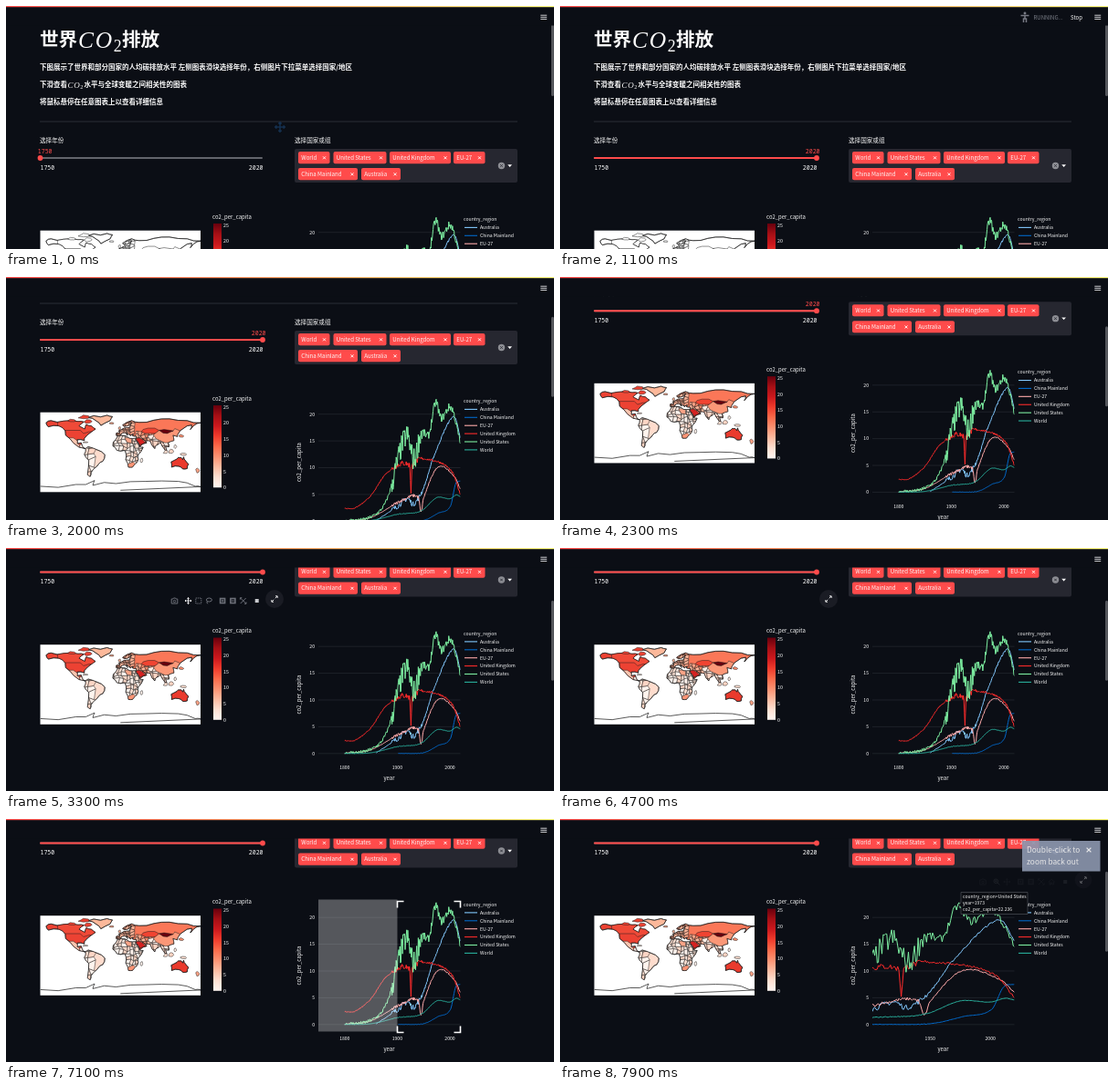
Animation of 600 by 267 pixels, one loop 8 s. Source, as an HTML page:

```html
<!DOCTYPE html>
<html lang="zh">
<head>
<meta charset="utf-8">
<style>
  html, body { margin: 0; width: 100%; height: 100%; overflow: hidden; background: #0b0e15; }
  svg { display: block; width: 100%; height: 100%; }
  text { font-family: 'Noto Sans CJK SC', sans-serif; font-weight: 500; fill: #fafafa; white-space: pre; }
  .mono { font-family: 'Noto Sans Mono', monospace; font-weight: 400; }
  .math { font-family: 'Liberation Serif', serif; font-weight: 400; }
  .italic { font-style: italic; }
  .bold { font-weight: 700; }
  .light { font-weight: 400; }
  #land { stroke: #1c1c1c; stroke-width: 1; stroke-linejoin: round; }
  #land .coast { fill: none; stroke-width: 1.5; }
  #land.plain polygon:not(.coast) { fill: #fff; }
  .icon { fill: none; stroke: #6d7079; }
  .icon.on { stroke: #e4e4e6; }
</style>
</head>
<body>
<svg id="stage" viewBox="0 0 600 267"></svg>
<script>
const BG = '#0b0e15', RED = '#ff4b4b';

// ---------- helpers ----------
const text = (x, y, str, size, cls = '', attrs = '') =>
  `<text x="${x}" y="${y + size * .36}" font-size="${size}" class="${cls}" ${attrs}>${str}</text>`;
const rect = (x, y, w, h, fill, attrs = '') =>
  `<rect x="${x}" y="${y}" width="${w}" height="${h}" fill="${fill}" ${attrs}/>`;
const line = (x1, y1, x2, y2, stroke, width = 1) =>
  `<path d="M${x1} ${y1}L${x2} ${y2}" stroke="${stroke}" stroke-width="${width}"/>`;
const cross = (x, y, r, stroke, width = 1) =>
  line(x - r, y - r, x + r, y + r, stroke, width) + line(x - r, y + r, x + r, y - r, stroke, width);
const ramp = (t, a, b) => Math.min(1, Math.max(0, (t - a) / (b - a)));
const END = 'text-anchor="end"', MID = 'text-anchor="middle"';

let seed = 7;
const random = () => (seed = seed * 16807 % 2147483647) / 2147483647;
const jitter = size => (random() - .5) * size;
const pick = list => list[Math.floor(random() * list.length)];
const parse = points => points.split(' ').map(p => p.split(',').map(Number));

// ---------- page top ----------
const formula = (x, y, size) =>
  text(x, y, 'C', size, 'math italic') + text(x + size * .74, y, 'O', size, 'math italic') +
  text(x + size * 1.52, y + size * .25, '2', size * .7, 'math');

const tag = (x, y, width, label) =>
  rect(x, y, width, 13.2, RED, 'rx="2"') + text(x + 3.3, y + 6.7, label, 6.1) +
  cross(x + width - 6, y + 6.8, 1.5, '#fff', .9);

const intro = `
  ${text(37, 37, '世界', 20.6, 'bold')}${formula(79, 37, 25.5)}${text(127, 37, '排放', 20.6, 'bold')}
  ${text(37, 67, '下图展示了世界和部分国家的人均碳排放水平 左侧图表滑块选择年份，右侧图片下拉菜单选择国家/地区', 7.5, 'bold')}
  ${text(37, 86.5, '下滑查看', 7.5, 'bold')}${formula(67.5, 86.5, 9)}
  ${text(85.5, 86.5, '水平与全球变暖之间相关性的图表', 7.5, 'bold')}
  ${text(37, 105.5, '将鼠标悬停在任意图表上以查看详细信息', 7.5, 'bold')}
  ${line(37, 127, 560, 127, '#2b2e36')}
  ${text(37, 147.5, '选择年份', 6.6, 'light')}${text(316, 147.5, '选择国家或组', 6.6, 'light')}`;

const slider = `
  ${rect(37, 166, 244, 2, '#62646b', 'rx="1"')}<g id="slider"></g>
  ${text(37.5, 177.5, '1750', 6.54, 'mono')}${text(281.5, 177.5, '2020', 6.54, 'mono', END)}`;

const picker = `
  ${rect(316, 157, 244, 37, '#262730', 'rx="2"')}
  ${tag(320, 160, 34.5, 'World')}${tag(358.5, 160, 58, 'United States')}
  ${tag(420, 160, 67, 'United Kingdom')}${tag(490, 160, 34.5, 'EU-27')}
  ${tag(320, 178, 65, 'China Mainland')}${tag(389, 178, 43, 'Australia')}
  <circle cx="542.5" cy="175.5" r="3.7" fill="#8d8e94"/>${cross(542.5, 175.5, 1.3, '#262730', .8)}
  <path d="M549.2 174.3h4.8l-2.4 2.6z" fill="#fafafa"/>`;

// ---------- world map: coarse outlines in degrees, roughened by chance ----------
const HOT = '#ec4233', WARM = '#fa7758', PALE = ['#fff3ed', '#fff3ed', '#ffeee6', '#fee0d2', '#fdd5c4'];
const SALMON = ['#fb8d6d', '#fca285', '#fcb499', '#fcbba1'];
const polygon = (points, fill, cls = '') => `<polygon points="${points}" fill="${fill}" class="${cls}"/>`;

function rough(points) {
  return points.flatMap(([x, y], i) => {
    const [nx, ny] = points[(i + 1) % points.length];
    const bend = jitter(.25);
    return [[x, y], [(x + nx) / 2 + (ny - y) * bend, (y + ny) / 2 - (nx - x) * bend]];
  }).join(' ');
}

// Countries: a bent grid of cells, later cut to the coast.
function countries(lon, lat, columns, rows, step, fills) {
  const at = (i, j) => corners[j * (columns + 1) + i];
  const corners = Array.from({ length: (columns + 1) * (rows + 1) }, (_, k) =>
    [lon + step * (k % (columns + 1)) + jitter(step), lat + step * Math.floor(k / (columns + 1)) + jitter(step)]);
  let cells = '';
  for (let j = 0; j < rows; j++)
    for (let i = 0; i < columns; i++)
      cells += polygon([at(i, j), at(i + 1, j), at(i + 1, j + 1), at(i, j + 1)].join(' '), pick(fills));
  return cells;
}

function continent(id, outline, fill, inside = '') {
  const coast = rough(parse(outline));
  return `<clipPath id="${id}">${polygon(coast)}</clipPath>${polygon(coast, fill)}
    <g clip-path="url(#${id})">${inside}</g>${polygon(coast, 'none', 'coast')}`;
}

function island(lon, lat, rx, ry, fill) {
  const points = Array.from({ length: 7 }, (_, i) => {
    const a = i / 7 * 2 * Math.PI, r = 1 + jitter(.6);
    return [lon + rx * r * Math.cos(a), lat + ry * r * Math.sin(a)];
  });
  return polygon(points.join(' '), fill);
}

const land = [
  continent('northAmerica', '-167,66 -156,71 -128,70 -95,69 -82,68 -93,59 -80,52 -77,62 -65,59 -56,52 -66,45 -81,31 -81,26 -97,28 -97,19 -88,21 -83,9 -78,8 -105,20 -123,38 -124,48 -138,59 -162,57', HOT,
    polygon('-141,58 -141,75 -50,75 -50,46 -70,46 -83,42 -90,49 -125,49', '#ef4a38') +
    polygon('-118,32 -106,32 -97,26 -90,10 -120,10', '#fdc6b0') + polygon('-92,16 -87,18 -75,7 -90,7', '#fff0e8')),
  continent('greenland', '-73,78 -60,82 -30,83 -18,80 -23,71 -44,60 -54,70', '#fcb89a'),
  continent('southAmerica', '-78,8 -72,12 -52,5 -35,-6 -40,-21 -49,-27 -58,-36 -66,-46 -68,-55 -74,-51 -71,-18 -81,-5', '#fedccd',
    countries(-86, -58, 2, 6, 14, PALE)),
  continent('africa', '-6,36 10,37 20,31 34,31 43,12 51,11 40,-6 40,-16 33,-27 27,-34 18,-34 12,-17 13,-6 9,4 -8,4 -17,14 -16,23', '#fff3ed',
    countries(-20, -28, 9, 8, 8, PALE) + polygon('9,32 25,33 25,20 15,22', '#fca487') +
    polygon('14,-28 29,-22 34,-27 28,-36 16,-36', '#fc9576')),
  continent('eurasia', '-9,43 -9,37 -2,37 3,43 10,44 16,38 13,45 23,37 28,41 27,37 36,36 35,28 44,13 59,21 50,30 57,25 67,25 77,8 81,16 90,22 98,8 104,1 101,13 109,12 107,21 120,26 118,38 128,35 130,42 141,53 160,61 157,51 165,60 180,66 150,71 110,75 75,72 42,67 25,71 5,61 8,58 18,60 24,66 22,60 20,55 8,54 -4,48 -1,44', WARM,
    countries(-12, 35, 7, 6, 6, SALMON) + countries(34, 24, 5, 3, 7, SALMON) +
    countries(64, 5, 6, 4, 9, PALE) +
    polygon('47,46 51,51 62,54 77,54 87,49 80,42 56,42', '#f14432') +
    polygon('74,39 87,49 118,47 122,53 134,48 122,22 100,21 80,30', '#fb9777') +
    polygon('87,49 98,51 118,48 105,42 96,43', '#67000d') +
    polygon('34,30 42,32 50,28 56,20 43,16', '#d52221') + polygon('43,16 56,20 62,22 44,11', '#ef4533')),
  continent('australia', '114,-22 122,-18 130,-12 136,-12 140,-17 142,-11 146,-19 153,-27 150,-37 140,-38 131,-32 115,-34', '#ea3a2d'),
  island(-110, 71, 9, 2.5, HOT), island(-74, 69, 9, 4, HOT), island(-80, 79, 13, 3.5, HOT),
  island(-79, 22, 5, 1, PALE[3]), island(-2, 54, 3, 4, SALMON[2]), island(-19, 65, 5, 2, SALMON[1]),
  island(47, -19, 3, 6, PALE[0]), island(137, 36, 5, 3, SALMON[0]), island(123, 12, 3, 5, PALE[2]),
  island(102, 0, 5, 4, PALE[3]), island(114, 1, 5, 5, PALE[4]), island(141, -5, 9, 3, PALE[3]),
  island(173, -41, 4, 5, SALMON[1]),
  `<polyline class="coast" points="${rough(parse('-180,-77 -100,-73 -58,-64 -62,-75 -10,-71 55,-66 130,-66 168,-77 180,-78'))}"/>`
].join('');

const reds = ['#67000d', '#a50f15', '#cb181d', '#ef3b2c', '#fb6a4a', '#fc9272', '#fcbba1', '#fee0d2', '#fff5f0'];
const worldMap = `
  ${rect(37.5, 106.7, 175.5, 87.6, '#fff')}
  <clipPath id="mapArea">${rect(-180, -90, 360, 180)}</clipPath>
  <g id="land" transform="translate(125.3 150.4) scale(.4875 -.4875)" clip-path="url(#mapArea)">${land}</g>
  ${text(226, 91.5, 'co2_per_capita', 5.95)}
  ${rect(227, 99, 9, 90.3, 'url(#reds)')}
  ${[0, 5, 10, 15, 20, 25].map(v => text(238, 189.3 - 3.54 * v, v, 5.3)).join('')}`;

// ---------- emission curves: a few "year,value" points, smoothed, with yearly noise ----------
const series = [
  ['Australia', '#83c9ff', 1, '1860,.1 1902,2.9 1920,4.2 1931,3.2 1950,6.2 1970,12.2 2007,19.6 2020,15.6'],
  ['China Mainland', '#0068c9', .15, '1902,0 1950,.15 1978,1.5 2001,2.8 2011,7 2020,7.5'],
  ['EU-27', '#ffabab', .6, '1800,.05 1850,.7 1913,4.1 1940,4.5 1945,1.7 1950,4.3 1977,10.1 2008,8.4 2020,6'],
  ['United Kingdom', '#ff2b2b', 1.1, '1800,2.4 1820,2.5 1850,4.8 1880,9 1924,10.4 1926,5.4 1928,10.4 1970,11.3 2004,9.2 2020,5'],
  ['United States', '#7defa1', 4.5, '1800,.05 1850,.8 1880,4 1917,16 1932,11.5 1945,16.5 1960,16.2 1973,22.2 1983,19.3 2003,21.2 2020,14.5'],
  ['World', '#29b09d', .15, '1800,.01 1850,.15 1902,1.3 1945,1.9 1975,4.4 2000,4.2 2012,4.9 2020,4.6']];

const PLOT = { left: 342, right: 497.5, top: 89, height: 145 };
const yOf = value => 226.3 - 5.88 * value;

function yearly(points, noise) {
  const keys = parse(points), last = keys.length - 1;
  const slope = i => {
    const [a, b] = [keys[Math.max(0, i - 1)], keys[Math.min(last, i + 1)]];
    return (b[1] - a[1]) / (b[0] - a[0]);
  };
  const data = [];
  for (let i = 0; i < last; i++) {
    const [y0, v0] = keys[i], [y1, v1] = keys[i + 1], span = y1 - y0;
    for (let y = y0; y < y1; y++) {
      const u = (y - y0) / span, w = 1 - u;
      const smooth = w * w * (1 + 2 * u) * v0 + u * u * (1 + 2 * w) * v1 + u * w * span * (w * slope(i) - u * slope(i + 1));
      const strength = y < 1890 ? .15 : y < 1948 ? 1 : .35;
      data.push([y, Math.max(0, smooth + jitter(noise * strength))]);
    }
  }
  return [...data, keys[last]];
}
const curves = series.map(([, color, noise, points]) => ({ color, data: yearly(points, noise) }));

function plot(id, firstYear, ticks) {
  const xOf = year => PLOT.left + (year - firstYear) / (2020 - firstYear) * (PLOT.right - PLOT.left);
  const paths = curves.map(({ color, data }) =>
    `<polyline fill="none" stroke="${color}" stroke-linejoin="round" points="${
      data.map(([y, v]) => xOf(y).toFixed(1) + ',' + yOf(v).toFixed(1)).join(' ')}"/>`).join('');
  return `<g id="${id}"><g clip-path="url(#plotArea)">${paths}</g>
    ${ticks.map(y => text(xOf(y), 242, y, 5.1, '', MID)).join('')}</g>`;
}

const chart = `
  ${[0, 5, 10, 15, 20].map(v => line(PLOT.left, yOf(v), PLOT.right, yOf(v), '#22262e', .8) +
    text(338, yOf(v), v, 5.1, '', END)).join('')}
  ${plot('fullPlot', 1750, [1800, 1900, 2000])}${plot('zoomPlot', 1902, [1950, 2000])}
  ${text(419.5, 253.5, 'year', 5.95, '', MID)}
  <g transform="translate(321 161.5) rotate(-90)">${text(0, 0, 'co2_per_capita', 5.95, '', MID)}</g>
  ${text(501, 94.4, 'country_region', 5.1)}
  ${series.map(([name, color], i) => line(502, 103.4 + 8.9 * i, 516, 103.4 + 8.9 * i, color, 1.1) +
    text(519, 103.4 + 8.9 * i, name, 5.1)).join('')}
  <g id="selection"></g>`;

// ---------- toolbars ----------
const icons = {
  camera: '<path d="M-3.3-2h1.6l.7-1h2l.7 1h1.6v5h-6.6z"/><circle cy=".5" r="1.2"/>',
  zoom: '<circle cx="-.7" cy="-.7" r="2.3"/><path d="M1 1L3.4 3.4M-1.8-.7h2.2M-.7-1.8v2.2"/>',
  pan: '<path d="M-3.5 0h7M0-3.5v7M-2.4-1.1L-3.5 0l1.1 1.1M2.4-1.1L3.5 0 2.4 1.1M-1.1-2.4L0-3.5l1.1 1.1M-1.1 2.4L0 3.5l1.1-1.1"/>',
  box: '<rect x="-3" y="-3" width="6" height="6" stroke-dasharray="1.2 .8"/>',
  lasso: '<ellipse cx=".3" cy="-1" rx="3" ry="2"/><path d="M-1.8.5q-1 1.5.5 2.8"/>',
  plus: '<rect x="-2.5" y="-2.5" width="5" height="5" stroke-width="1.6"/><path d="M-1.4 0h2.8M0-1.4v2.8"/>',
  minus: '<rect x="-2.5" y="-2.5" width="5" height="5" stroke-width="1.6"/><path d="M-1.4 0h2.8"/>',
  reset: '<path d="M-3-3L3 3M-3 3L3-3M-3.3-1.4v-1.9h1.9M3.3 1.4v1.9H1.4"/>',
  home: '<path d="M-3.5.3L0-2.8 3.5.3M-2.2 0v3h1.5V1h1.4v2h1.5V0"/>',
  badge: '<rect x="-2" y="-2" width="4" height="4" fill="#c8c9cd" stroke="none"/>'
};
function toolbar(id, x, y, groups, active) {
  let content = '';
  for (const group of groups.split('|')) {
    for (const name of group.split(' ')) {
      content += `<g class="icon ${name === active ? 'on' : ''}" transform="translate(${x} ${y})">${icons[name]}</g>`;
      x += 11.3;
    }
    x += 3.7;
  }
  return `<g id="${id}">${content}</g>`;
}
const expand = (id, x, y, r) => `<g id="${id}" transform="translate(${x} ${y})">
  <circle r="${r}" fill="#1a1c24"/>
  <path d="M.8-.8L3-3M-.8.8L-3 3M1-3.2h2.2V-1M-1 3.2h-2.2V1" fill="none" stroke="#e0e0e2"/></g>`;

const toolbars = `
  ${toolbar('mapBar', 184.5, 58.5, 'camera|pan box lasso|plus minus reset|badge', 'pan')}
  ${expand('mapExpand', 294, 56.5, 10)}
  ${toolbar('chartBar', 463, 69.5, 'camera|zoom pan|plus minus reset home|badge', 'zoom')}
  ${expand('chartExpand', 573, 67.5, 9.3)}`;

// ---------- overlays ----------
const running = `<g id="running">
  <g fill="none" stroke="#777a84" stroke-width="1.5"><circle cx="509" cy="8" r=".7"/>
    <path d="M504.5 10.5h9M509 10.5v3.5M507.5 18v-4h3v4"/></g>
  ${text(518.5, 12.5, 'RUNNING...', 6, '', 'style="fill:#7d808a"')}${text(559, 12.5, 'Stop', 6)}</g>`;

const tooltip = `<g id="tooltip">
  <path d="M436 95l3-2.5V81h73v24h-73v-8z" fill="#0b0d12" stroke="#5a5d64" stroke-width=".6"/>
  ${['country_region=United States', 'year=1973', 'co2_per_capita=22.236'].map((s, i) => text(441, 85.8 + 7 * i, s, 5)).join('')}</g>`;

const toast = `<g id="toast">${rect(506, 24, 85.5, 33.5, '#8c97af')}
  ${text(511, 34.5, 'Double-click to', 8.3)}${text(511, 46.8, 'zoom back out', 8.3)}${cross(579, 34, 2.4, '#fff', 1.3)}</g>`;

document.getElementById('stage').innerHTML = `
  <defs>
    <linearGradient id="bar"><stop stop-color="#ff4b4b"/><stop offset="1" stop-color="#fffd80"/></linearGradient>
    <linearGradient id="reds" x2="0" y2="1">${reds.map((c, i) => `<stop offset="${i / 8}" stop-color="${c}"/>`).join('')}</linearGradient>
    <clipPath id="plotArea">${rect(PLOT.left, PLOT.top, PLOT.right - PLOT.left, PLOT.height)}</clipPath>
  </defs>
  ${rect(0, 0, 600, 267, BG)}
  <g id="page">${intro}${slider}${picker}
    <g transform="translate(0 140)">${worldMap}${chart}${toolbars}${tooltip}</g>
  </g>
  <g id="scrollbar">${rect(597, 11, 3, 88, '#55575d', 'rx="1.5"')}</g>
  ${rect(0, 0, 600, 21.5, BG)}${rect(0, 0, 600, 1.2, 'url(#bar)')}
  ${[10.2, 12.3, 14.4].map(y => line(585.3, y, 592.2, y, '#e6e6e8', .9)).join('')}
  ${running}
  <g id="mover" transform="translate(300 133) scale(1.5)" fill="none" stroke="#15304f">${icons.pan}</g>
  ${toast}`;

// ---------- animation ----------
const DRAG = 6500, RELEASE = 7250;
const $ = id => document.getElementById(id);
const show = (id, opacity) => $(id).setAttribute('opacity', Number(opacity));
const shift = (id, y) => $(id).setAttribute('transform', `translate(0 ${y})`);

const scrollAt = t => 43 * ramp(t, 1300, 1600) + 55 * ramp(t, 1600, 2000) + 42.5 * ramp(t, 2000, 2400);

function drawSlider(p) {
  const x = 37.5 + 243.5 * p;
  $('slider').innerHTML = rect(37, 166, x - 37, 2, RED, 'rx="1"') +
    `<circle cx="${x}" cy="167" r="2.9" fill="${RED}"/>` +
    text(34.8 + 234 * p, 159.5, 1750 + Math.round(270 * p), 6.54, 'mono', `style="fill:${RED}"`);
}

function drawSelection(t) {
  const left = 428.5, right = left + 69 * ramp(t, DRAG - 100, 7000), top = 91, bottom = 235;
  const dim = `fill-opacity="${.3 * ramp(t, DRAG - 100, DRAG + 200)}"`;
  const corner = (x, y, dx, dy) => `M${x + dx} ${y}H${x}V${y + dy}`;
  const arm = Math.min(7, (right - left) / 2);
  $('selection').innerHTML =
    rect(PLOT.left, PLOT.top, left - PLOT.left, PLOT.height, '#fff', dim) +
    rect(right, PLOT.top, PLOT.right - right, PLOT.height, '#fff', dim) +
    `<path fill="none" stroke="#fff" stroke-width="1.6" d="${corner(left, top, arm, 7)}${corner(right, top, -arm, 7)}${
      corner(left, bottom, arm, -7)}${corner(right, bottom, -arm, -7)}"/>`;
}

const start = performance.now();
function frame() {
  const t = Math.floor((performance.now() - start) % 8000 / 100) * 100;
  const scroll = scrollAt(t), zoomed = t >= RELEASE, dragging = t >= DRAG && !zoomed;
  shift('page', -scroll);
  shift('scrollbar', scroll / 3);
  drawSlider(ramp(t, 0, 800));
  drawSelection(t);
  $('land').setAttribute('class', t < 1300 ? 'plain' : '');
  show('selection', dragging);
  show('scrollbar', !dragging);
  show('mover', t < 100);
  show('running', t >= 1100 && t < 2000);
  show('fullPlot', !zoomed);
  show('zoomPlot', zoomed);
  show('mapBar', ramp(t, 2400, 2700) - ramp(t, 4400, 4700));
  show('mapExpand', ramp(t, 2400, 2700) - ramp(t, 4700, 5000));
  const chartHover = zoomed ? ramp(t, 7850, 8500) : dragging ? 0 : ramp(t, 4800, 5200);
  show('chartBar', chartHover);
  show('chartExpand', zoomed ? ramp(t, 7700, 8200) : chartHover);
  show('tooltip', t >= 7600);
  show('toast', .9 * ramp(t, 7200, 7800));
  requestAnimationFrame(frame);
}
frame();
</script>
</body>
</html>
```
